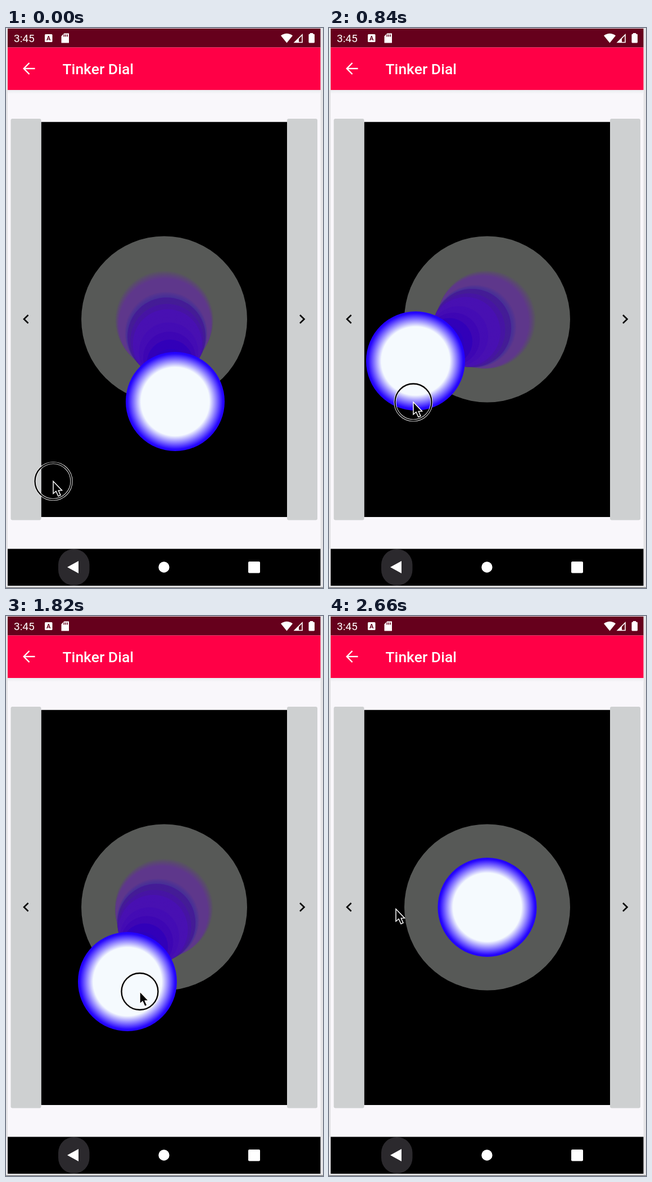
An HTML page with a canvas for the animation above (2800 ms loop, 564x994 px).

```html
<!DOCTYPE html>
<html lang="en">
<head>
<meta charset="utf-8">
<title>Tinker Dial</title>
<style>
  html, body { margin: 0; width: 100%; height: 100%; overflow: hidden; background: #e4e3e6; }
  canvas { display: block; }
</style>
</head>
<body>
<canvas id="stage" width="564" height="994"></canvas>
<script>
const ctx = document.getElementById('stage').getContext('2d');
const STEP = 140;
const BASE = { x: 281.5, y: 517, r: 147.5 };
const HAT = 88;

// One pose per step: pointer position, then stick offset from the base centre.
const poses = [
  [84, 804.5, 19.5, 146], [34, 575, -100, 108], [184, 317, -144.5, 34], [335, 244, -5, -147],
  [366, 286, 40.5, -142], [148, 575, 35.5, -143], [150, 664, -127.5, 74], [214, 666, -99, 110],
  [277, 522, -64.5, 133], [297, 415, 10.5, -50], [276, 190, 10.5, -147], [245, 330, -5, -147],
  [226, 608, -26.5, -145], [238, 666.5, -65.5, 132], [320, 598, 5, 117], [268, 500, 60, 44],
  [103.5, 467.5, -95, -37], [97, 485, -143, -35], [119, 520, -147, 3], [119, 520, 0, 0]
];

// Trail colours, by share of the way from hat back to base.
const bands = [
  [0.79, '#441c96'], [0.745, '#4614a3'], [0.7, '#4810b2'], [0.6, '#440cb4'],
  [0.53, '#3e06b4'], [0.47, '#3200b9'], [0.4, '#2c00be']
];

function rect(x, y, w, h, color, r = 0) {
  ctx.fillStyle = color;
  ctx.beginPath();
  ctx.roundRect(x, y, w, h, r);
  ctx.fill();
}

function disc(x, y, r, color) {
  ctx.fillStyle = color;
  ctx.beginPath();
  ctx.arc(x, y, r, 0, Math.PI * 2);
  ctx.fill();
}

function trace(points, closed) {
  ctx.beginPath();
  points.forEach(([x, y]) => ctx.lineTo(x, y));
  if (closed) ctx.closePath();
}

function shape(points, color) {
  trace(points, true);
  ctx.fillStyle = color;
  ctx.fill();
}

function line(points, color, width, closed = false) {
  trace(points, closed);
  ctx.strokeStyle = color;
  ctx.lineWidth = width;
  ctx.stroke();
}

function text(str, x, y, font, color = '#fff') {
  ctx.font = font + ' Roboto, sans-serif';
  ctx.fillStyle = color;
  ctx.fillText(str, x, y);
}

function statusBar() {
  rect(3, 1, 556.5, 33.5, '#66001c');
  text('3:45', 14, 25, '19px');
  rect(69, 11, 13.5, 14, '#fff', 1.5);
  text('A', 72, 22, 'bold 11px', '#66001c');
  shape([[98.5, 14.5], [103.5, 9.5], [112, 9.5], [112, 26.5], [98.5, 26.5]], '#fff');
  for (let i = 0; i < 3; i++) rect(102.5 + i * 3, 11.5, 1.5, 4, '#66001c');

  ctx.fillStyle = '#fff';
  ctx.beginPath();
  ctx.moveTo(499.5, 26.5);
  ctx.lineTo(489, 13.5);
  ctx.quadraticCurveTo(499.5, 6, 510, 13.5);
  ctx.fill();
  line([[513.5, 25.5], [527, 25.5], [527, 12]], '#fff', 1.6, true);
  shape([[513, 26], [521, 26], [521, 18]], '#fff');
  rect(541, 9, 5, 3, '#fff');
  rect(538.5, 10.5, 10.5, 16, '#fff', 1.5);
}

function appBar() {
  rect(3, 34.5, 556.5, 75.5, '#ff0046');
  line([[51.5, 72], [32, 72]], '#fff', 2.4);
  line([[41.5, 62], [31.7, 72], [41.5, 82]], '#fff', 2.4);
  text('Tinker Dial', 100.5, 82, '500 26.5px');
  const shade = ctx.createLinearGradient(0, 110, 0, 117);
  shade.addColorStop(0, '#e9ecef');
  shade.addColorStop(1, '#f9f7fb');
  rect(3, 110, 556.5, 7, shade);
}

function navBar() {
  rect(3, 924.5, 556.5, 65.5, '#000');
  rect(93, 925, 55.5, 64.5, '#2b292d', 27.5);
  shape([[109, 957], [129, 946], [129, 968]], '#fff');
  disc(281, 957, 9.7, '#fff');
  rect(431, 947, 21, 20.5, '#fff', 2);
  rect(0, 990, 564, 1.5, '#eeeef0');
  rect(0, 992.5, 564, 1.5, '#88888a');
}

function screen() {
  rect(0, 0, 564, 994, '#e4e3e6');
  rect(3, 1, 556.5, 989, '#f9f7fb');
  statusBar();
  appBar();
  navBar();
  rect(8.5, 161, 54, 712.5, '#ced0d1', 3);
  rect(500, 161, 54, 712.5, '#ced0d1', 3);
  line([[39.5, 509.5], [32, 516.8], [39.5, 524]], '#000', 2.6);
  line([[523, 509.5], [530.5, 516.8], [523, 524]], '#000', 2.6);
}

function trail(dx, dy) {
  const puff = (f, color) =>
    disc(BASE.x + dx * (1 - f), BASE.y + dy * (1 - f), HAT * f, color);
  for (let i = 0; i < 8; i++) puff(0.99 - i * 0.008, 'rgba(100,0,222,0.06)');
  for (let i = 0; i < 4; i++) puff(0.83 - i * 0.01, 'rgba(54,46,160,0.17)');
  for (let f = 0.79; f > 0.15; f -= 0.01) {
    const band = bands.filter(b => b[0] >= f - 0.001).pop();
    puff(f, band[1]);
  }
}

function hat(x, y) {
  const glow = ctx.createRadialGradient(x, y, 0, x, y, HAT);
  glow.addColorStop(0, '#f5fafe');
  glow.addColorStop(0.69, '#f5fafe');
  glow.addColorStop(0.96, '#2808ff');
  glow.addColorStop(1, '#2000ff');
  disc(x, y, HAT, glow);
}

function joystick(dx, dy) {
  const k = Math.min(1, BASE.r / (Math.hypot(dx, dy) || 1));
  dx *= k;
  dy *= k;
  ctx.save();
  ctx.beginPath();
  ctx.rect(62.5, 166.5, 437.5, 701.5);
  ctx.clip();
  ctx.fillStyle = '#000';
  ctx.fill();
  disc(BASE.x, BASE.y, BASE.r, '#575957');
  if (dx || dy) trail(dx, dy);
  hat(BASE.x + dx, BASE.y + dy);
  ctx.restore();
}

function ring(x, y, width, color) {
  ctx.beginPath();
  ctx.arc(x, y, 32.5, 0, Math.PI * 2);
  ctx.lineWidth = width;
  ctx.strokeStyle = color;
  ctx.stroke();
}

function pointer(x, y, pressed) {
  if (pressed) {
    ring(x, y, 4.2, '#eee');
    ring(x, y, 2.3, '#000');
  }
  const arrow = [[0, 0], [0, 22], [5, 17.8], [9, 26.5], [13, 24.7], [9.3, 16.5], [15.5, 16.2]]
    .map(([ax, ay]) => [x + ax, y + ay]);
  shape(arrow, '#000');
  line(arrow, '#fff', 1.5, true);
}

function draw(now) {
  const step = Math.floor(now / STEP) % poses.length;
  const [px, py, dx, dy] = poses[step];
  screen();
  joystick(dx, dy);
  pointer(px, py, step < poses.length - 1);
  requestAnimationFrame(draw);
}

draw(0);
</script>
</body>
</html>
```
